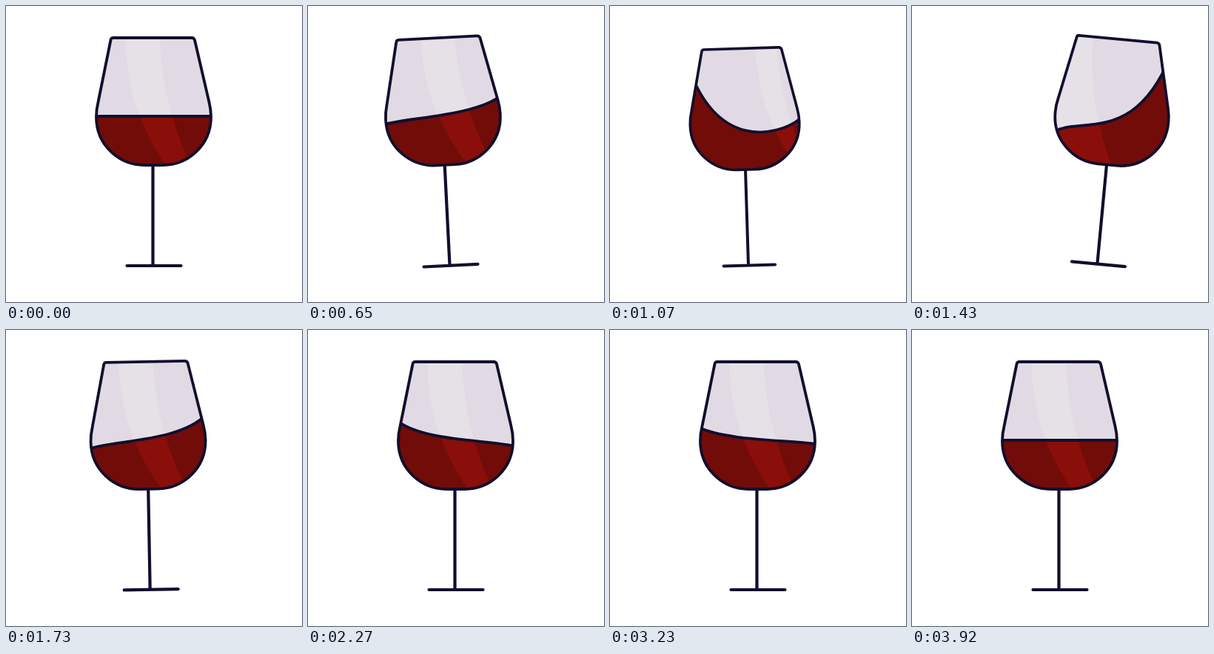
Write an HTML page with a canvas that moves like this. It is 400x400 px and loops after 3980 ms.

```html
<!DOCTYPE html>
<html lang="en">
<head>
<meta charset="utf-8">
<title>Swirling wine glass</title>
<style>
html, body { margin: 0; width: 100%; height: 100%; overflow: hidden; background: #fff; }
canvas { display: block; }
</style>
</head>
<body>
<canvas id="stage" width="400" height="400"></canvas>
<script>
const ctx = document.getElementById('stage').getContext('2d');
const LOOP = 3980, LEVEL = 149, LEFT = 120, RIGHT = 279;
const INK = '#120e2d', GLASS = '#e1dae4', GLOSS = '#e5e1e7', WINE = '#720c08', WINE_GLOSS = '#8a0e09';
const BASE = { x: 199, y: 351 };

// Key points: [time, value]
const shift = [[530, 0], [565, 5], [800, -56], [1380, 53], [1680, -4], [1900, 0]];
const tilt = [[530, 0], [555, .9], [748, -6.8], [795, -6.8], [1385, 5.5], [1660, -1.2], [1880, 0]];
const gloss = [[530, 0], [860, 65], [960, 65], [1410, -72], [1720, 0]];

// The wine is thrown about, then swings with a steady period and fading height
const slosh = [[530, 0], [780, -50], [1080, 66], [1440, -115]];
for (let i = 0; i < 4; i++) slosh.push([2070 + 490 * i, 70 * (-.72) ** i]);
slosh.push([3920, 0]);

const bowl = new Path2D('M145 43H251Q254 43 255 46L274.5 130Q277 140 277 150' +
  'C277 189 245 215 212 215H187C154 215 122 189 122 150Q122 140 124.5 130L141.5 46Q142 43 145 43Z');
const stem = new Path2D('M198.5 215V351M163.5 351H236.5');

const cubic = p => p < .5 ? 4 * p ** 3 : 1 - 4 * (1 - p) ** 3;
const sine = p => (1 - Math.cos(Math.PI * p)) / 2;

function at(keys, t, ease) {
  const i = keys.findIndex(k => k[0] > t);
  if (i < 0) return keys[keys.length - 1][1];
  if (i === 0) return keys[0][1];
  const [t0, a] = keys[i - 1], [t1, b] = keys[i];
  return a + (b - a) * ease((t - t0) / (t1 - t0));
}

// 0 to 1 and back while the glass passes the far side of its circle
function farness(t) {
  const p = (t - 700) / 850;
  return p > 0 && p < 1 ? Math.sin(Math.PI * p) ** 2 : 0;
}

// Wine climbs one wall, sinks less at the other, and keeps about the same volume
function surface(swing, lift) {
  const wall = k => LEVEL - lift - (k > 0 ? k : .3 * k);
  const l = wall(swing), r = wall(-swing), d = r - l;
  const mid = (4 * LEVEL - l - r - 48 * Math.tanh(Math.abs(d) / 90)) / 2;
  const skew = d * Math.abs(d) / 1000;
  const path = new Path2D();
  path.moveTo(LEFT, l);
  path.bezierCurveTo(LEFT + 35, mid + skew, RIGHT - 35, mid - skew, RIGHT, r);
  return path;
}

function band(l) {
  const r = 50 * Math.tanh(l / 50);
  const path = new Path2D();
  path.moveTo(161 + l, 40);
  path.bezierCurveTo(163 + l, 110, 178 + l, 160, 218 + l, 218);
  path.lineTo(251 + r, 218);
  path.bezierCurveTo(226 + r, 165, 210 + r, 110, 208 + r, 40);
  path.closePath();
  return path;
}

function fill(path, color) {
  ctx.fillStyle = color;
  ctx.fill(path);
}

function stroke(path, width) {
  ctx.lineWidth = width;
  ctx.stroke(path);
}

function draw(t) {
  const x = at(shift, t, cubic), far = farness(t), size = 1 - .05 * far;
  const shine = band(at(gloss, t, cubic));
  const top = surface(at(slosh, t, sine), 25 * far);
  const wine = new Path2D(top);
  wine.lineTo(RIGHT, 220);
  wine.lineTo(LEFT, 220);
  wine.closePath();

  ctx.clearRect(0, 0, 400, 400);
  ctx.save();
  ctx.translate(BASE.x + x, BASE.y - Math.abs(x) * .045);
  ctx.rotate(at(tilt, t, cubic) * Math.PI / 180);
  ctx.scale(size, size);
  ctx.translate(-BASE.x, -BASE.y);
  ctx.strokeStyle = INK;
  ctx.lineCap = ctx.lineJoin = 'round';

  stroke(stem, 4.2);
  ctx.save();
  ctx.clip(bowl);
  fill(bowl, GLASS);
  fill(shine, GLOSS);
  fill(wine, WINE);
  ctx.save();
  ctx.clip(wine);
  fill(shine, WINE_GLOSS);
  ctx.restore();
  stroke(top, 3.8);
  ctx.restore();
  stroke(bowl, 3.8);
  ctx.restore();
}

const start = performance.now();
function tick() {
  draw((performance.now() - start) % LOOP);
  requestAnimationFrame(tick);
}
tick();
</script>
</body>
</html>
```
